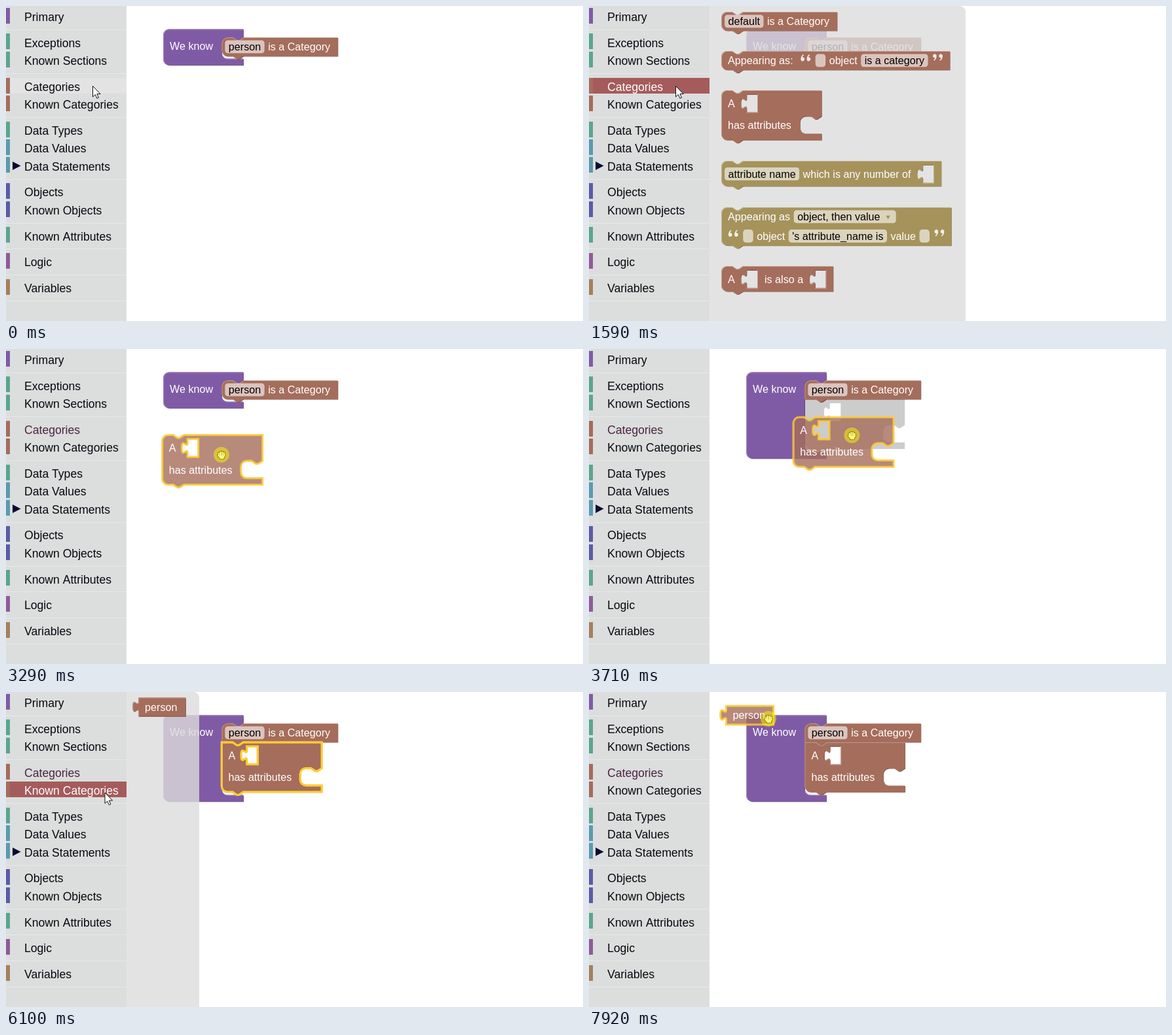
Write an HTML page with a canvas that moves like this. It is 881x482 px and loops after 7.99 s.

```html
<!DOCTYPE html>
<html lang="en">
<head>
<meta charset="utf-8">
<title>Block editor</title>
<style>
html, body { margin: 0; width: 100%; height: 100%; overflow: hidden; background: #fff; }
canvas { display: block; }
</style>
</head>
<body>
<canvas id="stage" width="881" height="482"></canvas>
<script>
const ctx = document.getElementById('stage').getContext('2d');
const LOOP = 7990, SCALE = 1.1;
const FONT = '"Liberation Sans", Arial, sans-serif';
const PURPLE = [128, 91, 165], BROWN = [165, 109, 91], OLIVE = [165, 147, 91];
const rgb = (c, a = 1) => `rgba(${c.join()},${a})`;
const blend = (c, target, k) => rgb(c.map(v => Math.round(v + (target - v) * k)));

// ---- Block outlines, in block units ----
const NOTCH = 'l6,4 3,0 6,-4', NOTCH_BACK = 'l-6,4 -3,0 -6,-4';
const TAB = 'c0,10 -8,-8 -8,7.5 s8,-2.5 8,7.5';
const slot = (y, h, right) =>
  `V${y} ${NOTCH_BACK} h-7 a8,8 0 0 0 -8,8 v${h - 16} a8,8 0 0 0 8,8 H${right}`;
const socket = x => `M${x},5.5 v5 ${TAB} V30.5 h15 v-25 z`;
const stackPath = (w, h, { inner = '', sockets = [], squareTop, squareBottom } = {}) =>
  (squareTop ? 'M0,0' : 'M0,8 a8,8 0 0 1 8,-8') +
  ` H15 ${NOTCH} H${w} ${inner} V${h} H30 ${NOTCH_BACK} ` +
  (squareBottom ? 'H0 z ' : 'H8 a8,8 0 0 1 -8,-8 z ') + sockets.map(socket).join(' ');

const knowPath = grow =>
  `M0,8 a8,8 0 0 1 8,-8 H111 ${slot(11, 30 + grow, 111)} V${50 + grow} H8 a8,8 0 0 1 -8,-8 z`;
const attributesPath = squareTop =>
  stackPath(139, 69, { inner: slot(36, 24, 139), sockets: [35], squareTop });
const valuePath = `M0,0 H65.5 V26 H0 V20 c0,-10 -8,8 -8,-7.5 s8,2.5 8,-7.5 z`;

// ---- Rows of labels, [fields] and quote marks ----
const OPEN = { quote: 1 }, CLOSE = { quote: -1 }, GAP = { gap: 5 };
const ATTRIBUTE_ROWS = [[9.2, 18, 'A'], [9.2, 48.3, 'has attributes']];

function quoteMark(x, y, direction) {
  ctx.save();
  ctx.translate(x + 8, y - 4);
  ctx.scale(direction, direction);
  ctx.fillStyle = 'rgba(255,255,255,.85)';
  for (const dx of [-4.2, 4.2]) {
    const p = new Path2D(`M${dx - 3},3.5 q-.6,-6 3.6,-8 l.5,1.2 q-2,1.2 -2,2.8 q3,.3 3,2.8 a2.7,2.7 0 0 1 -5.1,1.2 z`);
    ctx.fill(p);
  }
  ctx.restore();
}

function drawRow([x, center, ...parts]) {
  ctx.font = '14.667px ' + FONT;
  for (const part of parts) {
    if (typeof part === 'string') {
      ctx.fillStyle = '#fff';
      ctx.fillText(part, x, center + 5.2);
      x += ctx.measureText(part).width + 5;
    } else if (part.quote) {
      quoteMark(x, center, part.quote);
      x += 21;
    } else if (part.gap) {
      x += part.gap;
    } else {
      const [text, dropdown] = part;
      const w = ctx.measureText(text).width + 10 + (dropdown ? 17 : 0);
      ctx.fillStyle = 'rgba(255,255,255,.6)';
      ctx.beginPath();
      ctx.roundRect(x, center - 9, w, 18, 4);
      ctx.fill();
      ctx.fillStyle = '#000';
      ctx.fillText(text, x + 5, center + 5.2);
      if (dropdown) {
        ctx.fillStyle = rgb(OLIVE);
        ctx.fill(new Path2D(`M${x + w - 14},${center - 1.5} h6 l-3,5 z`));
      }
      x += w + 5;
    }
  }
}

function drawBlock(x, y, d, color, rows, { selected = false, alpha = 1 } = {}) {
  const path = new Path2D(d);
  ctx.save();
  ctx.translate(x, y);
  ctx.scale(SCALE, SCALE);
  if (!selected) {
    ctx.save();
    ctx.translate(.8, .8);
    ctx.fillStyle = blend(color, 0, .2);
    ctx.fill(path, 'evenodd');
    ctx.restore();
  }
  ctx.fillStyle = rgb(color, alpha);
  ctx.fill(path, 'evenodd');
  if (selected) {
    ctx.strokeStyle = `rgba(255,204,51,${alpha})`;
    ctx.lineWidth = 3;
    ctx.stroke(path);
  } else {
    ctx.save();
    ctx.clip(path, 'evenodd');
    ctx.translate(.5, .5);
    ctx.strokeStyle = blend(color, 255, .3);
    ctx.lineWidth = 1;
    ctx.stroke(path);
    ctx.restore();
  }
  rows.forEach(drawRow);
  ctx.restore();
}

// ---- Toolbox ----
const GREEN = '#5ba58f', BLUE = '#5b9bad', INDIGO = '#5b5ba5';
const GROUPS = [
  [['Primary', rgb(PURPLE)]],
  [['Exceptions', GREEN], ['Known Sections', GREEN]],
  [['Categories', rgb(BROWN)], ['Known Categories', rgb(BROWN)]],
  [['Data Types', GREEN], ['Data Values', BLUE], ['Data Statements', BLUE]],
  [['Objects', INDIGO], ['Known Objects', INDIGO]],
  [['Known Attributes', GREEN]],
  [['Logic', '#8f5b99']],
  [['Variables', '#a5805b']]
];

function drawToolbox(hovered, open, visited) {
  ctx.fillStyle = '#dcdddd';
  ctx.fillRect(0, 0, 184, 482);
  ctx.font = '17.6px ' + FONT;
  let top = 2.75;
  for (const group of GROUPS) {
    for (const [name, color] of group) {
      const y = Math.round(top);
      if (name === open || name === hovered) {
        ctx.fillStyle = name === open ? '#a55b5b' : '#e3e3e3';
        ctx.fillRect(6, y, 178, 24);
      }
      ctx.fillStyle = color;
      ctx.fillRect(0, y, 6, 24);
      ctx.fillStyle = name === open ? '#fff' : name === visited ? '#4a2440' : '#08080f';
      ctx.fillText(name, 28, Math.round(top + 20.3));
      if (name === 'Data Statements') {
        ctx.fillStyle = '#0a0a30';
        ctx.fill(new Path2D(`M10,${y + 7} l12.5,6.5 -12.5,6.5 z`));
      }
      top += 27.4;
    }
    top += 12.3;
    ctx.fillStyle = '#e8e8e8';
    ctx.fillRect(0, Math.round(top - 6.5), 184, 1);
  }
}

// ---- Flyouts ----
function flyoutPanel(right) {
  ctx.fillStyle = 'rgba(221,221,221,.8)';
  ctx.beginPath();
  ctx.roundRect(184, 0, right - 184, 490, [0, 9, 9, 0]);
  ctx.fill();
}

function drawCategoryFlyout(highlight) {
  flyoutPanel(575);
  drawBlock(202, 9, stackPath(160.5, 26), BROWN, [[4.6, 13, ['default'], 'is a Category']]);
  drawBlock(202, 69, stackPath(317, 26), BROWN,
    [[9.2, 13, 'Appearing as:', GAP, OPEN, ['\u00a0'], 'object', ['is a category'], CLOSE]]);
  drawBlock(202, 129, attributesPath(), BROWN, ATTRIBUTE_ROWS, { selected: highlight });
  drawBlock(202, 237, stackPath(305, 35, { sockets: [279.5] }), OLIVE,
    [[4.6, 18, ['attribute name'], 'which is any number of']]);
  drawBlock(202, 308, stackPath(319, 53), OLIVE, [
    [9.2, 13, 'Appearing as', ['object, then value', true]],
    [9.2, 40, OPEN, ['\u00a0'], 'object', ["'s attribute_name is"], 'value', ['\u00a0'], CLOSE]
  ]);
  drawBlock(202, 398, stackPath(155, 35, { sockets: [35, 130] }), BROWN,
    [[9.2, 18, 'A'], [60, 18, 'is also a']]);
}

const drawPerson = (x, y, style) =>
  drawBlock(x, y, valuePath, BROWN, [[9.2, 13, 'person']], style);

// ---- Pointer ----
function drawArrow() {
  const p = new Path2D('M0,0 V16.5 L3.8,13 L6.4,18.8 L8.9,17.7 L6.4,12 H11.6 Z');
  ctx.fillStyle = '#fff';
  ctx.strokeStyle = '#111';
  ctx.lineWidth = 1;
  ctx.fill(p);
  ctx.stroke(p);
}

function drawHand(closed) {
  const d = closed
    ? 'M-3.6,-2.5 V2 M-1,-4 V2 M1.8,-3.8 V2 M4.4,-2.3 V2 M-4.6,.8 L-2,4'
    : 'M-4.4,-5 L-3,2 M-1.4,-6.8 L-.8,1 M1.8,-6.8 L1.7,1 M5.2,-4.6 L4.2,2 M-6.5,.6 L-2.5,5';
  const fingers = new Path2D(d), palm = new Path2D('M-2.2,2.5 H3.2 L2.6,5.2 H-1.2 Z');
  ctx.lineCap = ctx.lineJoin = 'round';
  for (const [color, width] of [['#111', 4.2], ['#fff', 2.2]]) {
    ctx.strokeStyle = ctx.fillStyle = color;
    ctx.lineWidth = width;
    ctx.stroke(fingers);
    ctx.stroke(palm);
    ctx.fill(palm);
  }
  ctx.lineCap = 'butt';
  ctx.lineJoin = 'miter';
}

function drawPointer([x, y], kind, pressed) {
  ctx.save();
  ctx.translate(x, y);
  if (kind === 'arrow') drawArrow();
  else drawHand(kind === 'closed');
  if (pressed) {
    ctx.fillStyle = 'rgba(255,245,0,.5)';
    ctx.beginPath();
    ctx.arc(0, 0, 12, 0, 7);
    ctx.fill();
  }
  ctx.restore();
}

// ---- Motion: the pointer is sampled in discrete steps along curves ----
const mix = (a, b, u) => a + (b - a) * u;
const curve = (a, c, b, u) => a.map((v, i) => mix(mix(v, c[i], u), mix(c[i], b[i], u), u));
const middle = (a, b) => a.map((v, i) => (v + b[i]) / 2);

const MENU = [132.5, 122.5], PICK = [287, 159.5], DROP = [412, 122.5],
  KNOWN = [151, 154], VALUE = [266, 26];
const MOVES = [
  { start: 2190, end: 2600, steps: 7, from: MENU, to: PICK },
  { start: 3150, end: 3780, steps: 10, from: PICK, to: DROP, via: [360, 173] },
  { start: 4860, end: 5620, steps: 12, from: DROP, to: KNOWN },
  { start: 6480, end: 7110, steps: 10, from: KNOWN, to: VALUE },
  { start: 7780, end: 7920, steps: 3, from: VALUE, to: [274, 41] }
];

function pointerAt(t, lag = 0) {
  let point = MENU;
  for (const { start, end, steps, from, to, via = middle(from, to) } of MOVES) {
    if (t < start) break;
    const step = Math.min(steps, Math.floor((t - start) / ((end - start) / (steps - 1)) + .001) + 1);
    const u = step === steps ? 1 : (step - lag) / steps;
    point = curve(from, via, to, u);
  }
  return point;
}

const within = (t, a, b) => t >= a && t < b;
const inside = ([x, y], l, t, r, b) => x > l && x < r && y > t && y < b;

function drawRipple(t) {
  const progress = Math.floor((t - 4180) / 70) * 70 / 150;
  if (progress <= 0 || progress >= 1) return;
  ctx.strokeStyle = `rgba(136,136,136,${1 - progress})`;
  ctx.lineWidth = 10;
  ctx.beginPath();
  ctx.arc(351, 77, progress * 25, 0, 7);
  ctx.stroke();
}

function draw(t) {
  const pointer = pointerAt(t);
  const dragging = within(t, 3150, 4180), attached = t >= 4180;
  const dragPoint = pointerAt(t, .35);
  const dragX = dragPoint[0] - 85.5, dragY = dragPoint[1] - 30.5;
  const preview = dragging && Math.hypot(dragX - 329, dragY - 77) < 45;
  const stacked = preview || attached;

  ctx.fillStyle = '#fff';
  ctx.fillRect(0, 0, 881, 482);

  drawBlock(240, 35.3, knowPath(stacked ? 70 : 0), PURPLE, [[9.2, 24, 'We know']]);
  drawBlock(329.3, 48, stackPath(161, 26, { squareBottom: stacked }), BROWN,
    [[4.6, 13, ['person'], 'is a Category']]);
  if (preview) {
    ctx.save();
    ctx.translate(329.3, 77);
    ctx.scale(SCALE, SCALE);
    ctx.fillStyle = 'rgba(0,0,0,.2)';
    ctx.fill(new Path2D(attributesPath(true)), 'evenodd');
    ctx.restore();
  }
  if (attached) {
    drawBlock(329.3, 77, attributesPath(true), BROWN, ATTRIBUTE_ROWS, { selected: t < 7380 });
    drawRipple(t);
  }

  const overAttributes = inside(pointer, 202, 129, 354, 205);
  const overPerson = inside(pointer, 194, 8, 275, 38);
  const categoriesOpen = within(t, 1590, 3150), knownOpen = within(t, 6100, 7780);
  if (categoriesOpen) drawCategoryFlyout(overAttributes);
  if (knownOpen) {
    flyoutPanel(295);
    drawPerson(202, 8.5, { selected: overPerson });
  }

  const hovered = inside(pointer, 0, 110, 184, 134) ? 'Categories'
    : inside(pointer, 0, 137, 184, 161) ? 'Known Categories' : '';
  drawToolbox(hovered, categoriesOpen ? 'Categories' : knownOpen ? 'Known Categories' : '',
    t >= 3150 ? 'Categories' : '');

  const dragStyle = { selected: true, alpha: .8 };
  if (dragging) drawBlock(dragX, dragY, attributesPath(), BROWN, ATTRIBUTE_ROWS, dragStyle);
  if (t >= 7780) drawPerson(pointer[0] - 64.5, mix(8.5, 21.3, (pointer[1] - 26) / 15), dragStyle);

  const held = within(t, 2870, 4180) || t >= 7380;
  const grabbable = categoriesOpen ? overAttributes
    : knownOpen ? overPerson : within(t, 4180, 6100) && pointer[0] > 240;
  const pressed = held || within(t, 1390, 1590) || within(t, 5960, 6100);
  drawPointer(pointer, held ? 'closed' : grabbable ? 'open' : 'arrow', pressed);
}

const origin = performance.now();
function tick() {
  draw((performance.now() - origin) % LOOP);
  requestAnimationFrame(tick);
}
tick();
</script>
</body>
</html>
```
